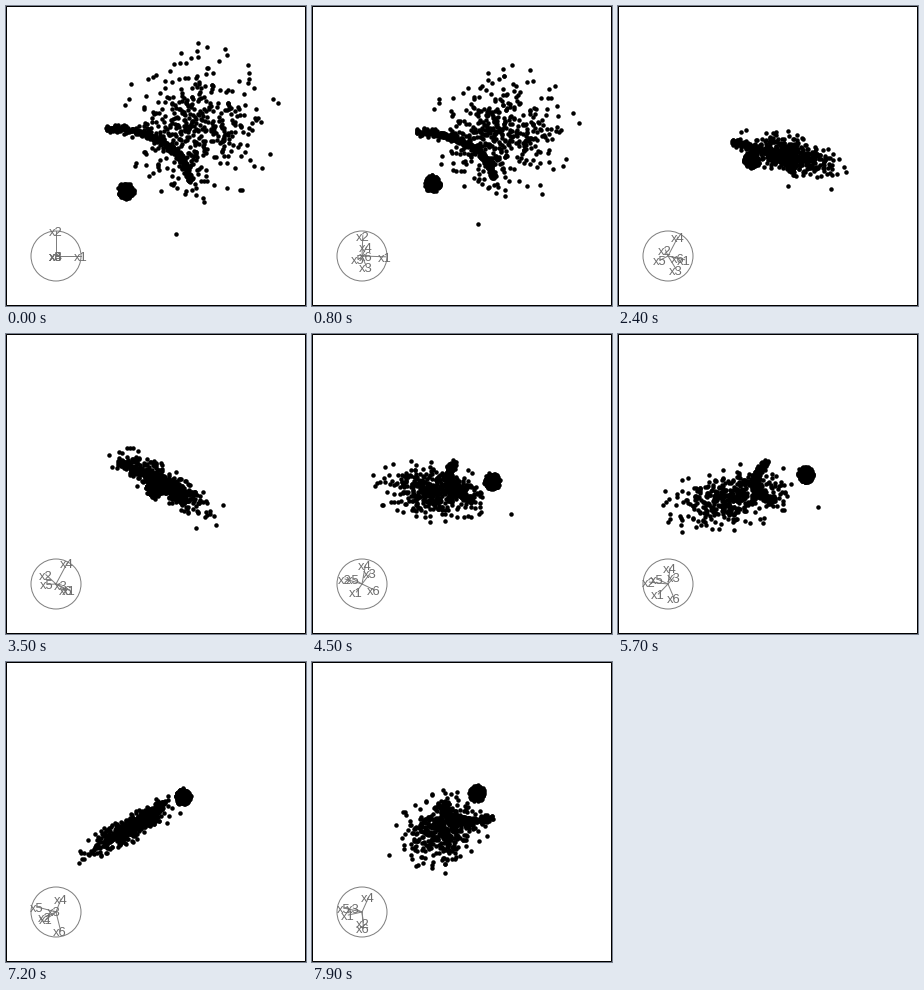
A matplotlib script for the animation above (8 s loop, 300 px wide and 300 px high).

```python
import numpy as np
import matplotlib.pyplot as plt
from matplotlib.animation import FuncAnimation
from matplotlib.patches import Circle, Rectangle

SIZE, FRAMES, STEP = 300, 80, 100
MID, DIMS = 150, 6
HUB, RADIUS = np.array([50, 250]), 25
GREY, INK = "#7f7f7f", "#6e6e6e"

# Where the tour turns: step -> across and up weights of x1..x6
TURNS = {
    0: np.eye(2, DIMS),
    18: [(.71, .07, .42, .35, -.28, .4), (-.08, .13, -.77, .6, -.22, 0)],
    36: [(.52, -.43, .2, .45, -.35, .42), (-.25, .36, 0, .8, 0, -.25)],
    45: [(-.22, -.68, .34, .14, -.34, .5), (-.32, .2, .44, .76, .2, -.24)],
    57: [(-.38, -.74, .24, .08, -.42, .24), (-.4, .08, .28, .64, .2, -.56)],
    66: [(-.18, -.75, .16, .16, -.55, .14), (-.46, 0, -.08, .44, .12, -.76)],
    79: [(-.54, .06, -.34, .26, -.7, .06), (-.12, -.44, .16, .6, .16, -.64)],
}


def place(x, y, noise):
    """Add 6-D noise around stage positions of the first view."""
    points = noise.copy()
    points[:, 0] += x - MID
    points[:, 1] += MID - y
    return points


def make_data():
    rng = np.random.default_rng(7)
    wide = rng.normal(0, 1, (430, DIMS)) * ([30, 30] + [5] * 4)
    t = rng.uniform(0, np.pi / 2, 320)
    arc = rng.normal(0, 1.7, (len(t), DIMS))
    ball = rng.normal(0, 1, (260, DIMS))
    ball *= 8.5 / np.linalg.norm(ball, axis=1, keepdims=True)
    return np.vstack([
        place(187, 118, wide),
        place(101 + 82 * np.sin(t), 175 - 53 * np.cos(t), arc),
        place(119.5, 185, ball),
    ])


def orthonormal(a):
    u, _, vt = np.linalg.svd(a, full_matrices=False)
    return u @ vt


KEYS = list(TURNS)
PLANES = [orthonormal(np.transpose(p)) for p in TURNS.values()]


def basis(step):
    i = min(np.searchsorted(KEYS, step, side="right"), len(KEYS) - 1)
    u = (step - KEYS[i - 1]) / (KEYS[i] - KEYS[i - 1])
    return orthonormal((1 - u) * PLANES[i - 1] + u * PLANES[i])


DATA = make_data()

fig = plt.figure(figsize=(3, 3), dpi=100, facecolor="white")
ax = fig.add_axes([0, 0, 1, 1])
ax.set(xlim=(0, SIZE), ylim=(SIZE, 0))
ax.axis("off")

PX = 72 / fig.dpi
ax.add_patch(Rectangle((.5, .5), SIZE - 1, SIZE - 1, fill=False,
                       ec="black", lw=PX, snap=False))
ax.add_patch(Circle(HUB, RADIUS, fill=False, ec=GREY, lw=PX))
dots, = ax.plot([], [], "o", color="black", ms=4.5 * PX, mew=0)
spokes = [ax.plot([], [], color=GREY, lw=PX)[0] for _ in range(DIMS)]
labels = [ax.text(0, 0, f"x{i + 1}", color=INK, fontsize=13 * PX,
                  family="Liberation Sans", ha="center", va="baseline")
          for i in range(DIMS)]


def draw(step):
    plane = basis(step)
    x, y = (DATA @ plane).T
    dots.set_data(MID + x, MID - y)
    for (dx, dy), spoke, label in zip(plane, spokes, labels):
        tip = HUB + RADIUS * np.array([dx, -dy])
        spoke.set_data(*zip(HUB, tip))
        label.set_position((tip[0] - .5, tip[1] + 5))
    return [dots, *spokes, *labels]


anim = FuncAnimation(fig, draw, frames=FRAMES, interval=STEP,
                     repeat=True, repeat_delay=0)
plt.show()
```
